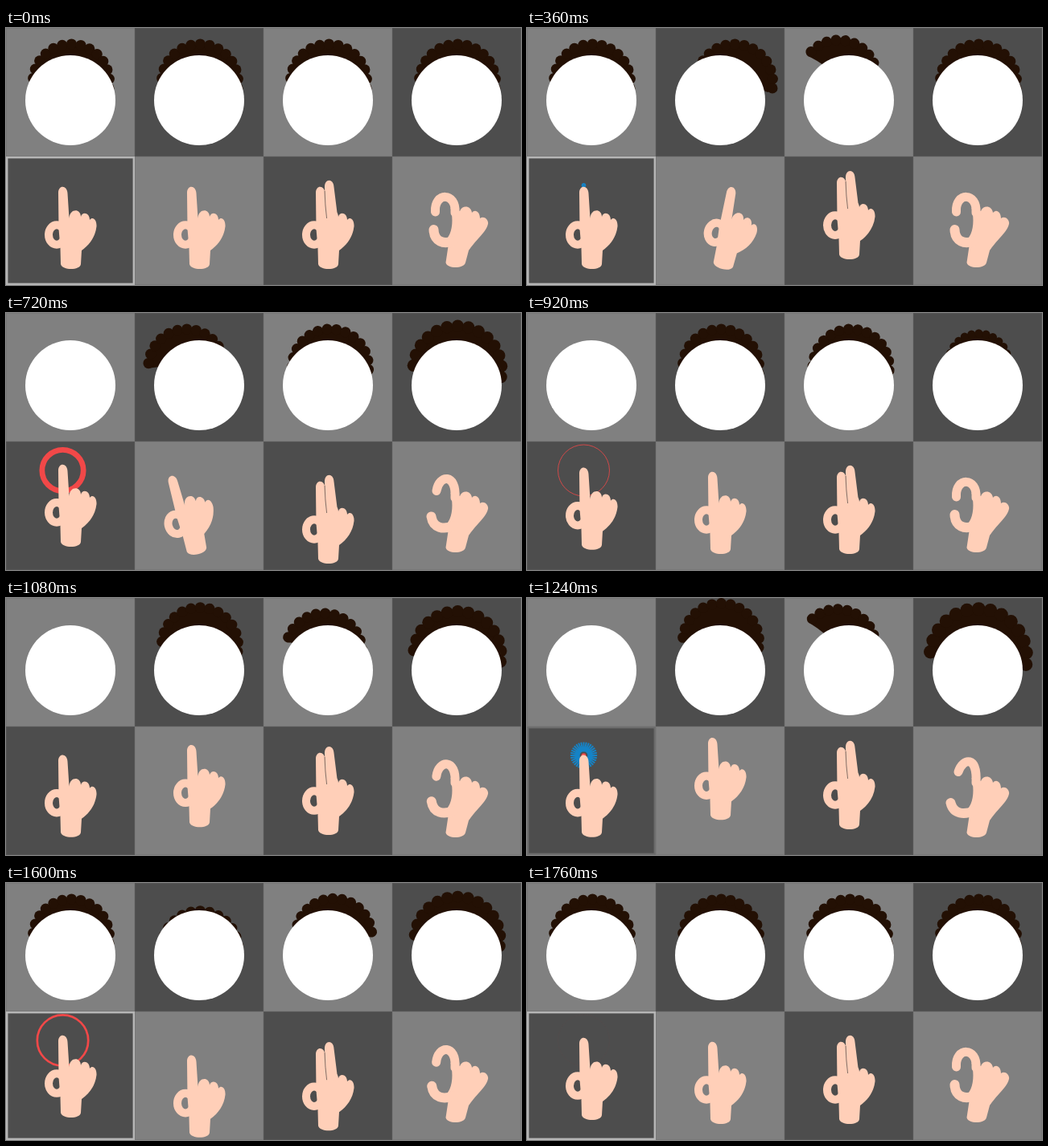
Write an HTML page that moves like this. It is 640 px wide and 320 px high and loops after 1800 ms.

```html
<!DOCTYPE html>
<html lang="en">
<head>
<meta charset="utf-8">
<title>Touch gestures</title>
<style>
html, body { margin: 0; width: 100%; height: 100%; overflow: hidden; background: #4d4d4d; }
svg { display: block; width: 640px; height: 320px; }
</style>
</head>
<body>
<svg id="stage" viewBox="0 0 640 320"></svg>
<script>
const LOOP = 1800, STEP = 40, HOLD = 120;
const LIGHT = '#808080', DARK = '#4d4d4d', SKIN = '#ffcfb8', HAIR = '#231004';
const TIP = { x: 70.5, y: 196 };
const TAP_OFF = 350, TAP_ON = 1170;

const stage = document.getElementById('stage');

function add(tag, attrs, parent = stage) {
  const el = document.createElementNS('http://www.w3.org/2000/svg', tag);
  set(el, attrs);
  parent.append(el);
  return el;
}
function set(el, attrs) {
  for (const k in attrs) el.setAttribute(k, attrs[k]);
}
const move = (el, transform) => set(el, { transform });

// Timing helpers
const clamp = v => Math.min(1, Math.max(0, v));
const ramp = (t, from, to) => clamp((t - from) / (to - from));
const hump = (t, from, to) => Math.sin(Math.PI * ramp(t, from, to));
const wave = (t, a, b, c, first, second) => first * hump(t, a, b) + second * hump(t, b, c);
const mix = (a, b, k) => a + (b - a) * k;

function polar(cx, cy, r, deg) {
  const a = deg * Math.PI / 180;
  return { x: cx + r * Math.cos(a), y: cy + r * Math.sin(a) };
}

// Cap of hair: a row of round curls over a filled arc
function addHair(parent) {
  const g = add('g', { fill: HAIR }, parent);
  const cx = 81, cy = 67.5, n = 14, from = -174, to = 9;
  const a = polar(cx, cy, 50, from), b = polar(cx, cy, 50, to);
  add('path', { d: `M${a.x} ${a.y} A50 50 0 0 1 ${b.x} ${b.y} L122 80 Q81 60 36 68.5 Z` }, g);
  for (let i = 0; i < n; i++) {
    const p = polar(cx, cy, 47.5, mix(from, to, i / (n - 1)));
    add('circle', { cx: p.x, cy: p.y, r: 6.6 }, g);
  }
  return g;
}

// Index finger up, thumb curled into a loop
function addPointer(parent) {
  const g = add('g', { fill: SKIN }, parent);
  add('ellipse', { cx: 63, cy: 257.5, rx: 10, ry: 12.3, fill: 'none', stroke: SKIN, 'stroke-width': 10 }, g);
  add('path', {
    d: 'M65 206 C64.5 195 76 195 76.5 206 L78.5 237 C79 225 92.5 224 93 235 ' +
       'C95 228 104 230 104 239 C108 234 113 239 112.5 247 C111 260 104 270 94 277 ' +
       'L93 294 C92 302 70 302 68 294 L67.5 274 L65.5 250 Z'
  }, g);
  return g;
}

function addSecondFinger(hand) {
  add('path', { d: 'M78 240 L76 199 C75.5 187 87 187 87.5 198 L92.5 238 Z', fill: SKIN }, hand);
  add('path', { d: 'M76 203 Q76.6 222 78.6 237', fill: 'none', stroke: '#75655d', 'stroke-width': .9 }, hand);
}

// Index finger and thumb forming an open claw
function addClaw(parent) {
  const g = add('g', { fill: SKIN }, parent);
  add('path', {
    d: 'M72.5 224 L84 228 C87 220 98 221 99 230 C103 225 109 229 109 237 ' +
       'C114 233 120 239 119 244 C117 254 106 261 95 277 L91 292 C89 300 68 300 66.5 292 ' +
       'L69.5 272 L68 262 C75 254 76 238 72.5 224 Z'
  }, g);
  const digit = width => add('path', {
    fill: 'none', stroke: SKIN, 'stroke-width': width, 'stroke-linecap': 'round'
  }, g);
  const index = digit(11), thumb = digit(12);
  return k => {
    set(index, {
      d: `M${mix(53.5, 56, k)} ${mix(229, 216.5, k)} C${mix(52, 62, k)} ${mix(204, 199, k)} 80 ${mix(204, 196, k)} 78 230`
    });
    set(thumb, { d: `M${mix(51.5, 46.5, k)} ${mix(251, 255, k)} C${mix(52, 50, k)} ${mix(266, 270, k)} 64 270 76 265` });
  };
}

// One column per gesture: head above, hand below
const cols = [0, 1, 2, 3].map(i => {
  const g = add('g', { transform: `translate(${i * 160} 0)` });
  const fills = i % 2 ? [DARK, LIGHT] : [LIGHT, DARK];
  fills.forEach((fill, row) => add('rect', {
    x: .5, y: row * 160 + .5, width: 159, height: 159, fill, stroke: fill === LIGHT ? '#797979' : '#545454'
  }, g));
  const hair = addHair(g);
  add('circle', { cx: 80, cy: 90, r: 56, fill: '#fff' }, g);
  return { g, hair };
});

const outline = { fill: 'none' };
const focus = add('rect', { ...outline, x: 1.2, y: 161.2, width: 157.6, height: 157.6, stroke: '#b6b6b6', 'stroke-width': 2.4 }, cols[0].g);
const rays = add('path', { ...outline, stroke: '#1583c6' }, cols[0].g);
const ring = add('circle', { ...outline, cx: TIP.x, cy: TIP.y, stroke: '#f24848' }, cols[0].g);
const [tapHand, panHand, scrollHand] = cols.slice(0, 3).map(c => addPointer(c.g));
addSecondFinger(scrollHand);
const setClaw = addClaw(cols[3].g);

function drawRays(u) {
  const live = u > 0 && u < 1, n = 32;
  const inner = 38 * u ** 1.5, outer = 38 * (1 - (1 - u) ** 2);
  let d = '';
  for (let i = 0; live && i < n; i++) {
    const a = polar(TIP.x, TIP.y, inner, i * 360 / n);
    const b = polar(TIP.x, TIP.y, outer, i * 360 / n);
    d += `M${a.x} ${a.y}L${b.x} ${b.y}`;
  }
  set(rays, { d, 'stroke-width': mix(2.5, .5, u), opacity: 1 - .6 * ramp(u, .75, 1) });
}

function drawRing(u) {
  const r = u < 1 ? 32 * (1 - (1 - u) ** 4) : 0;
  set(ring, { r, 'stroke-width': Math.min(2 * r, 11 * (1 - u) ** 1.2) });
}

function drawTap(t) {
  const lift = tap => ramp(t, tap + 40, tap + 180) * (1 - ramp(t, tap + 270, tap + 850));
  move(tapHand, `translate(0 ${-11 * (lift(TAP_OFF) + lift(TAP_ON))})`);
  set(focus, { opacity: 1 - ramp(t, 380, 520) + ramp(t, 1200, 1340) });
  set(cols[0].hair, { opacity: 1 - ramp(t, 400, 540) + ramp(t, 1360, 1520) });
  drawRays(ramp(t, 0, 280) && clamp((t - (t < TAP_ON ? TAP_OFF : TAP_ON)) / 280));
  drawRing(t < TAP_ON ? ramp(t, 600, 960) : ramp(t, 1234, 1764));
}

function drawPan(t) {
  const tilt = wave(t, 130, 520, 900, 13, -13);
  const side = wave(t, 130, 580, 900, 17, -17);
  move(panHand, `translate(0 ${wave(t, 1000, 1400, 1720, -25, 18)}) rotate(${tilt} 81 310)`);
  move(cols[1].hair, `translate(${side} ${wave(t, 1000, 1400, 1720, -14, 16)})`);
}

function drawScroll(t) {
  const y = wave(t, 120, 560, 880, -12, 12) + wave(t, 1040, 1360, 1640, -13, 19);
  const turn = wave(t, 120, 640, 980, 38, -8) + wave(t, 1040, 1380, 1720, 44, -18);
  move(scrollHand, `translate(0 ${y})`);
  move(cols[2].hair, `rotate(${turn} 81.5 45)`);
}

function drawPinch(t) {
  const open = ramp(t, 400, 540) - ramp(t, 640, 840) + ramp(t, 960, 1180) - ramp(t, 1480, 1700);
  const size = 1 + .26 * open - .22 * hump(t, 760, 1080);
  setClaw(open);
  move(cols[3].hair, `translate(81.5 45) scale(${size}) translate(-81.5 -45)`);
}

const start = performance.now();
function tick() {
  const step = Math.floor((performance.now() - start) % LOOP / STEP) * STEP;
  const t = step < HOLD ? 0 : step;
  for (const draw of [drawTap, drawPan, drawScroll, drawPinch]) draw(t);
  requestAnimationFrame(tick);
}
tick();
</script>
</body>
</html>
```
